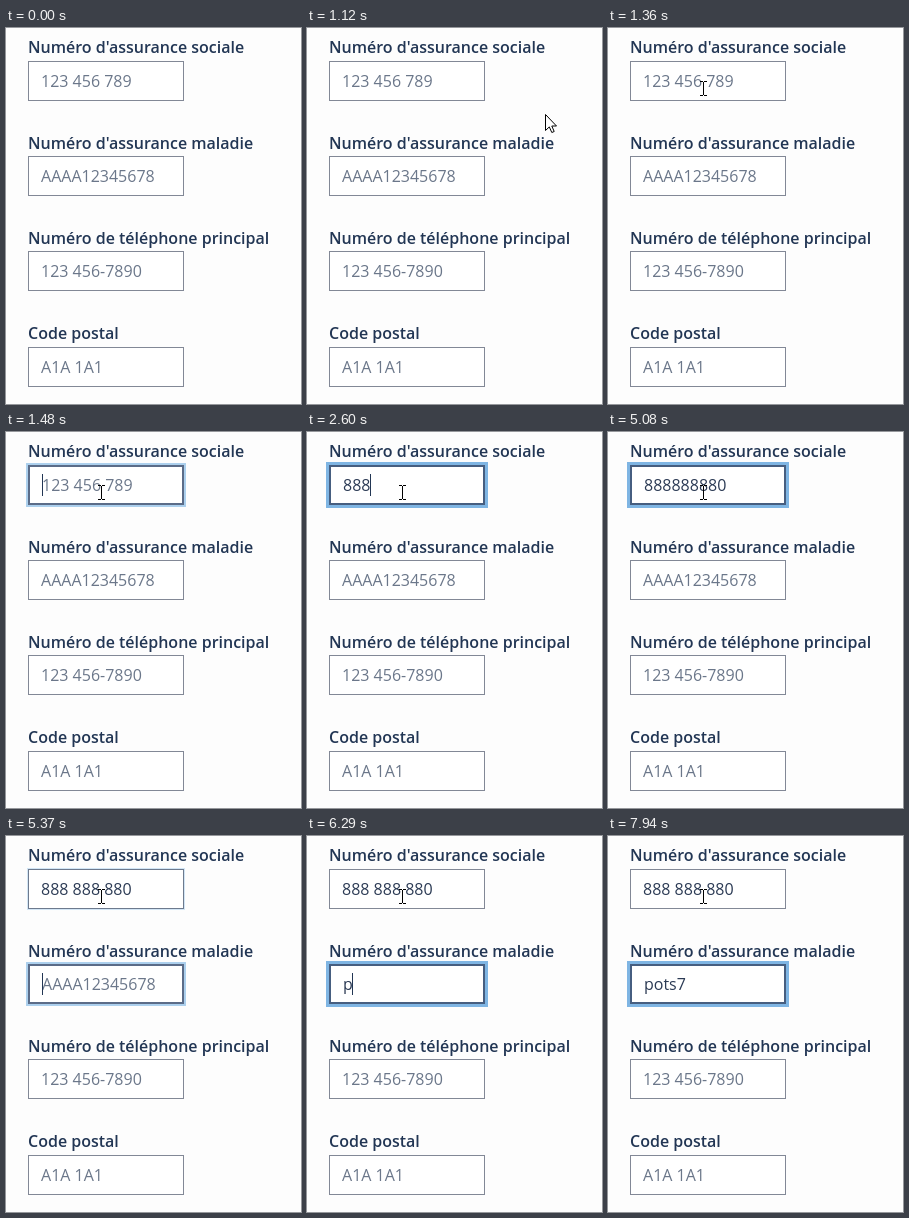
Animation of 295x376 px, one loop 8 s. Source, as an HTML page:

```html
<!DOCTYPE html>
<html lang="fr">
<head>
<meta charset="utf-8">
<style>
  html, body { margin: 0; width: 100%; height: 100%; overflow: hidden; background: #fdfdfd; }
  svg { display: block; width: 295px; height: 376px; font: 16px "Open Sans", "Noto Sans", sans-serif; }
  .label { font-weight: 600; fill: #223654; }
</style>
</head>
<body>
<svg id="stage" viewBox="0 0 295 376">
  <g id="form"></g>
  <g id="arrow">
    <path d="M.5 .5V16.5L4.3 12.9L6.8 18.5L9.2 17.5L6.8 12H11.5Z" fill="#fff" stroke="#000"/>
  </g>
  <path id="beam" d="M-3 -6.5H0M1 -6.5H4M.5 -6V7M-3 7.5H0M1 7.5H4" fill="none" stroke="#000"/>
</svg>
<script>
const LOOP = 8000, LEFT = 22, WIDTH = 156, HEIGHT = 40;
const FOCUS_1 = 1390, FOCUS_2 = 5280, FADE = 150;
const SVG_NS = 'http://www.w3.org/2000/svg';
const form = document.getElementById('form');
const arrow = document.getElementById('arrow');
const beam = document.getElementById('beam');

function add(tag, attrs, text = '') {
  const node = document.createElementNS(SVG_NS, tag);
  set(node, attrs);
  node.textContent = text;
  form.appendChild(node);
  return node;
}

function set(node, attrs) {
  for (const key in attrs) node.setAttribute(key, attrs[key]);
}

function makeField(label, labelY, top, placeholder) {
  add('text', { x: LEFT, y: labelY, class: 'label' }, label);
  const field = {
    top, placeholder,
    glow: add('rect', { fill: '#4a98d9' }),
    box: add('rect', { fill: '#fff' }),
    text: add('text', { y: top + 26 }),
    caret: add('rect', { y: top + 9, width: 1, height: 22, fill: '#223654' })
  };
  drawField(field, '', 0, false, false);
  return field;
}

function drawField(field, value, glow, focused, caretOn) {
  const { top } = field, spread = 3 * glow, border = focused ? 2 : 1;
  const textX = LEFT + 12 + border;
  set(field.glow, {
    x: LEFT - spread, y: top - spread,
    width: WIDTH + 2 * spread, height: HEIGHT + 2 * spread, opacity: 0.7 * glow
  });
  set(field.box, {
    x: LEFT + border / 2, y: top + border / 2,
    width: WIDTH - border, height: HEIGHT - border,
    'stroke-width': border, stroke: mix([130, 136, 150], [70, 94, 128], glow)
  });
  const shown = value || field.placeholder;
  if (field.text.textContent !== shown) field.text.textContent = shown;
  set(field.text, { x: textX, fill: value ? '#2b3a54' : '#6b778a' });
  const advance = value && caretOn ? field.text.getComputedTextLength() : 0;
  set(field.caret, { x: Math.floor(textX + advance), visibility: caretOn ? 'visible' : 'hidden' });
}

const mix = (a, b, k) => `rgb(${a.map((v, i) => Math.round(v + (b[i] - v) * k))})`;
const clamp = v => Math.min(1, Math.max(0, v));
const smooth = v => v * v * (3 - 2 * v);
const fade = (t, start) => smooth(clamp((t - start) / FADE));
const countPast = (times, t) => times.filter(at => t >= at).length;

const fields = [
  makeField("Numéro d'assurance sociale", 25, 33, '123 456 789'),
  makeField("Numéro d'assurance maladie", 121, 128, 'AAAA12345678'),
  makeField('Numéro de téléphone principal', 216, 223, '123 456-7890'),
  makeField('Code postal', 311, 319, 'A1A 1A1')
];

const keys1 = [2230, 2400, 2600, 3050, 3210, 3410, 3870, 4160, 4690];
const keys2 = [6290, 6390, 6620, 6880, 7770];
const blinks1 = [1900, 2430, 2980, 3510, 4030, 4560, 5080];
const blinks2 = [5790, 6290, 6850, 7370, 7940];

function drawPointer(t) {
  const k = 1 - (1 - clamp((t - 1090) / 270)) ** 2;
  const x = Math.round(277 - 182 * k), y = Math.round(93 - 33 * k);
  const overInput = x < LEFT + WIDTH && y < 73;
  const place = `translate(${x} ${y})`;
  set(arrow, { transform: place, visibility: t >= 1090 && !overInput ? 'visible' : 'hidden' });
  set(beam, { transform: place, visibility: t >= 1090 && overInput ? 'visible' : 'hidden' });
}

function draw(t) {
  const on1 = t >= FOCUS_1 && t < FOCUS_2, on2 = t >= FOCUS_2;
  const value1 = on2 ? '888 888 880' : '888888880'.slice(0, countPast(keys1, t));
  const value2 = 'pots7'.slice(0, countPast(keys2, t));
  drawField(fields[0], value1, fade(t, FOCUS_1) - fade(t, FOCUS_2), on1,
    on1 && countPast(blinks1, t) % 2 === 0);
  drawField(fields[1], value2, fade(t, FOCUS_2), on2,
    on2 && countPast(blinks2, t) % 2 === 0);
  drawPointer(t);
}

const start = performance.now();
function tick() {
  draw((performance.now() - start) % LOOP);
  requestAnimationFrame(tick);
}
tick();
</script>
</body>
</html>
```
